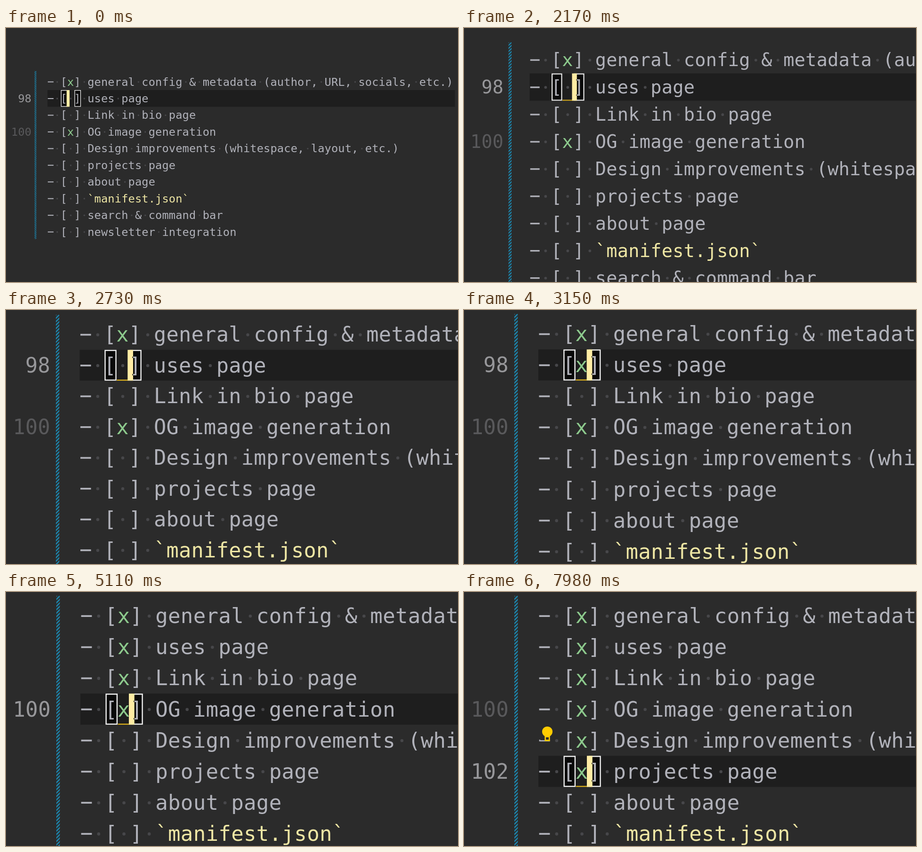
Animation of 960 by 540 pixels, one loop 8000 ms. Source, as an HTML page with a canvas:

```html
<!DOCTYPE html>
<html lang="en">
<head>
<meta charset="utf-8">
<title>Checklist</title>
<style>
  html, body { margin: 0; width: 100%; height: 100%; overflow: hidden; background: #2b2b2b; }
  canvas { display: block; width: 960px; height: 540px; }
</style>
</head>
<body>
<canvas id="stage" width="960" height="540"></canvas>
<script>
const ctx = document.getElementById('stage').getContext('2d');

const LOOP = 8000, STEP = 70;
const LEFT = 87.5, ADVANCE = 14.38, TOP = 114.25, PITCH = 35.45;
const FONT = '23.6px "DejaVu Sans Mono", monospace';
const BASELINE = 8.3, GLYPH_SHIFT = -0.55;
const FIRST_LINE = 97;
const COLOR = {
  bg: '#2b2b2b', row: '#1e1e1e', box: '#090909', border: '#f2f2f2',
  text: '#b1b2ba', check: '#8dca8d', code: '#eee6a4', dot: '#47474a',
  number: '#97979a', dimNumber: '#59595b', hatch: '#1c83aa',
  cursor: '#ffeca4', cursorText: '#3a3629', underline: '#e0b41c', bulb: '#ffcc00'
};

// Text of each item and the time its box gets ticked
const items = [
  ['general config & metadata (author, URL, socials, etc.)', 0],
  ['uses page', 3150],
  ['Link in bio page', 4300],
  ['OG image generation', 0],
  ['Design improvements (whitespace, layout, etc.)', 5850],
  ['projects page', 7150],
  ['about page', Infinity],
  ['`manifest.json`', Infinity],
  ['search & command bar', Infinity],
  ['newsletter integration', Infinity]
];

// Cursor stops: time, row, column
const moves = [
  [0, 1, 3], [1500, 1, 4], [3600, 2, 4], [4700, 3, 4], [5250, 4, 4], [6530, 5, 4]
];
const GLIDE = 80;
const BULB_TIME = 7450;

const zoom = { start: 1700, rate: 0.00553, scale: 1.866, x: -6.1, y: -162.6 };

const colX = col => LEFT + col * ADVANCE;
const rowY = row => TOP + row * PITCH;
const mix = (a, b, p) => a + (b - a) * p;

function spring(t) {
  const u = Math.max(0, t - zoom.start) * zoom.rate;
  return 1 - (1 + u) * Math.exp(-u);
}

function cursorAt(t) {
  const i = moves.findLastIndex(m => m[0] <= t);
  const [start, row, col] = moves[i];
  const from = moves[Math.max(0, i - 1)];
  const u = Math.min(1, (t - start) / GLIDE);
  const p = 1 - (1 - u) ** 3;
  return { row, col, x: colX(mix(from[2], col, p)) - 1.9, y: rowY(mix(from[1], row, p)) - PITCH / 2 };
}

function rect(x, y, w, h, color) {
  ctx.fillStyle = color;
  ctx.fillRect(x, y, w, h);
}

function drawGlyph(ch, col, row, color) {
  ctx.fillStyle = color;
  ctx.fillText(ch, colX(col) + GLYPH_SHIFT, rowY(row) + BASELINE);
}

function drawChars(text, col, row, color) {
  [...text].forEach((ch, i) => {
    if (ch !== ' ') return drawGlyph(ch, col + i, row, color);
    ctx.fillStyle = COLOR.dot;
    ctx.beginPath();
    ctx.arc(colX(col + i + 0.5) - 0.3, rowY(row) + 0.4, 1.75, 0, 7);
    ctx.fill();
  });
}

function drawItem(row, t) {
  const [text, tickTime] = items[row];
  rect(LEFT + 1.3, rowY(row) - 0.7, 12.2, 2, COLOR.text);
  drawChars(' [', 1, row, COLOR.text);
  drawChars(t >= tickTime ? 'x' : ' ', 3, row, COLOR.check);
  drawChars('] ', 4, row, COLOR.text);
  drawChars(text, 6, row, text[0] === '`' ? COLOR.code : COLOR.text);
}

function drawNumbers(active) {
  ctx.textAlign = 'right';
  items.forEach((_, row) => {
    const n = FIRST_LINE + row;
    if (row !== active && n % 10) return;
    ctx.fillStyle = row === active ? COLOR.number : COLOR.dimNumber;
    [...String(n)].reverse().forEach((d, i) =>
      ctx.fillText(d, 54 - i * ADVANCE, rowY(row) + BASELINE));
  });
  ctx.textAlign = 'left';
}

function drawHatch() {
  const x = 60.6, y = 91.6, w = 3.94, h = 357;
  ctx.save();
  ctx.beginPath();
  ctx.rect(x, y, w, h);
  ctx.clip();
  ctx.beginPath();
  for (let k = y; k < y + h + 2 * w; k += w) {
    ctx.moveTo(x - 1, k + 1);
    ctx.lineTo(x + w + 1, k - w - 1);
  }
  ctx.strokeStyle = COLOR.hatch;
  ctx.lineWidth = 1.5;
  ctx.stroke();
  ctx.restore();
}

function drawBracketBoxes(row) {
  const y = rowY(row) - PITCH / 2, line = 1.3;
  for (const col of [2, 4]) {
    const x = colX(col) + 0.3, w = ADVANCE - 0.6;
    rect(x, y, w, PITCH, COLOR.box);
    ctx.strokeStyle = COLOR.border;
    ctx.lineWidth = line;
    ctx.strokeRect(x + line / 2, y + line / 2, w - line, PITCH - line);
  }
}

function drawCursor(cur) {
  const w = 6.3;
  rect(cur.x, cur.y, w, PITCH, COLOR.cursor);
  ctx.save();
  ctx.beginPath();
  ctx.rect(cur.x, cur.y, w, PITCH);
  ctx.clip();
  const bracket = cur.col === 4 ? [']', 4] : ['[', 2];
  drawGlyph(...bracket, cur.row, COLOR.cursorText);
  ctx.restore();
}

function drawBulb(row) {
  const x = 98.1, y = rowY(row) - 9.8;
  rect(x - 8, y - 6, 15, 15.7, COLOR.bg);
  ctx.fillStyle = COLOR.bulb;
  ctx.beginPath();
  ctx.arc(x, y, 5.9, 0, 7);
  ctx.fill();
  rect(x - 3, y + 4, 6, 6.8, COLOR.bulb);
  rect(x - 1.6, y + 6.4, 3.2, 2.7, COLOR.bg);
}

function draw(t) {
  const p = spring(t), cur = cursorAt(t);
  const s = mix(1, zoom.scale, p);
  ctx.setTransform(1, 0, 0, 1, 0, 0);
  rect(0, 0, 960, 540, COLOR.bg);
  ctx.setTransform(s, 0, 0, s, zoom.x * p, zoom.y * p);
  ctx.font = FONT;
  ctx.textBaseline = 'alphabetic';

  rect(88, rowY(cur.row) - PITCH / 2, 865.5, PITCH, COLOR.row);
  drawBracketBoxes(cur.row);
  drawHatch();
  drawNumbers(cur.row);
  items.forEach((_, row) => drawItem(row, t));
  if (cur.col === 4) {
    rect(colX(3), rowY(cur.row) + PITCH / 2 - 1.2, ADVANCE, 1.2, COLOR.underline);
  }
  drawCursor(cur);
  if (t >= BULB_TIME) drawBulb(4);
}

const begin = performance.now();
function tick() {
  const t = (performance.now() - begin) % LOOP;
  draw(Math.floor(t / STEP) * STEP);
  requestAnimationFrame(tick);
}
tick();
</script>
</body>
</html>
```
